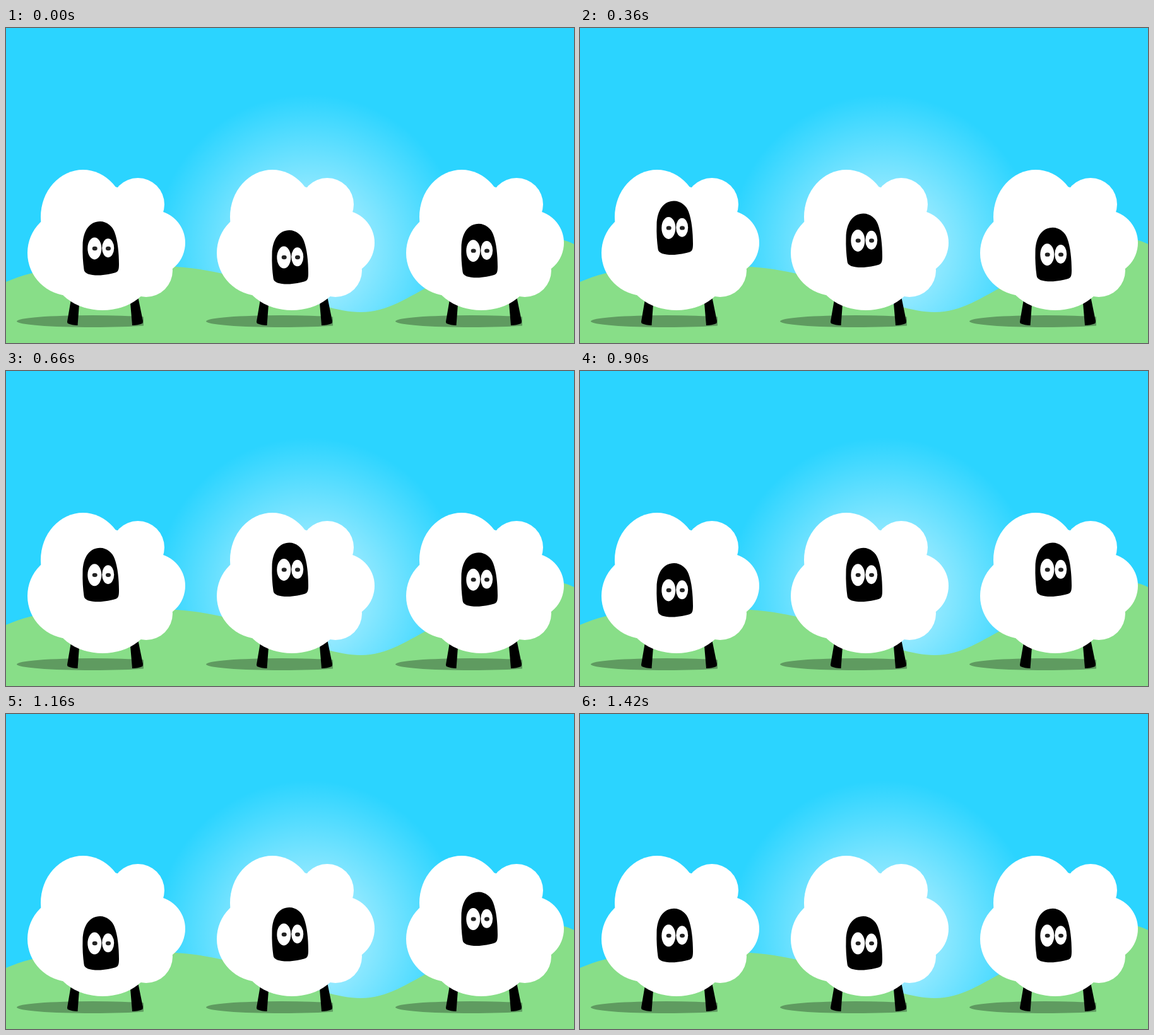
An HTML page with a canvas that plays this animation: 900x500 px, repeating every 1.44 s.

```html
<!DOCTYPE html>
<html lang="en">
<head>
<meta charset="utf-8">
<title>Three sheep</title>
<style>
  html, body { margin: 0; width: 100%; height: 100%; overflow: hidden; }
  canvas { display: block; width: 900px; height: 500px; }
</style>
</head>
<body>
<canvas id="stage" width="900" height="500"></canvas>
<script>
const ctx = document.getElementById('stage').getContext('2d');
const LOOP = 1440, STEP = 20, SPACING = 300;

const hills = new Path2D(`M0 403 C80 368 190 374 270 379 C400 388 490 451 562 451
  C605 451 635 428 680 405 C760 362 840 313 900 343 V500 H0 Z`);
const legs = new Path2D(`M104 425 L97 466 Q97 468 98 469 Q105 472 113.500 472 L117 425 Z
  M196 425 L200 472 Q209 472 216 469 Q217 468 217 465 L208 421 Z`);
const head = new Path2D(`M149 0 C133 0 122 14 121.500 38 C121 52 122 65 123.500 76
  C124 83 133 85.500 146 85.500 C156 85.500 168 83 174 81 C178 79.500 179 76 179 68
  C179 50 177 30 172 17 C169 8 160 0 149 0 Z`);

// Wool puffs: centre x, centre y, radius x, radius y
const wool = [
  [122, 300, 67, 75], [209, 280, 42, 42], [232, 341, 52, 52],
  [222, 385, 42, 42], [102, 357, 68, 68], [153, 385, 80, 63],
  [155, 335, 85, 85]
];

function fill(path, color) {
  ctx.fillStyle = color;
  ctx.fill(path);
}

function oval(x, y, rx, ry, color) {
  ctx.fillStyle = color;
  ctx.beginPath();
  ctx.ellipse(x, y, rx, ry, 0, 0, Math.PI * 2);
  ctx.fill();
}

function drawScene() {
  ctx.fillStyle = '#2bd4ff';
  ctx.fillRect(0, 0, 900, 500);
  const glow = ctx.createRadialGradient(480, 350, 0, 480, 350, 245);
  glow.addColorStop(0, 'rgba(255,255,255,0.75)');
  glow.addColorStop(1, 'rgba(255,255,255,0)');
  ctx.fillStyle = glow;
  ctx.fillRect(0, 0, 900, 500);
  fill(hills, '#88de88');
}

function drawShadow() {
  ctx.save();
  ctx.beginPath();
  ctx.rect(0, 450, 218, 30);
  ctx.clip();
  oval(137, 465.5, 120, 9.5, '#5f9b60');
  ctx.restore();
}

function drawHead(y) {
  ctx.save();
  ctx.translate(0, y);
  fill(head, '#000');
  oval(140.3, 43, 11, 17.5, '#fff');
  oval(161.7, 42.3, 9.5, 15, '#fff');
  oval(140.7, 43, 4, 3.2, '#222');
  oval(162, 43, 4, 3.2, '#222');
  ctx.restore();
}

function drawSheep(index, phase) {
  ctx.save();
  ctx.translate(index * SPACING, 0);
  drawShadow();
  fill(legs, '#000');
  wool.forEach(puff => oval(...puff, '#fff'));
  drawHead(296.6 + 24.5 * Math.cos(phase + (1 - index) * Math.PI / 3));
  ctx.restore();
}

function render(now) {
  const time = Math.floor((now % LOOP) / STEP) * STEP;
  const phase = (time + STEP) / LOOP * Math.PI * 2;
  drawScene();
  for (let i = 0; i < 3; i++) drawSheep(i, phase);
}

let start;
function tick(now) {
  start ??= now;
  render(now - start);
  requestAnimationFrame(tick);
}
render(0);
requestAnimationFrame(tick);
</script>
</body>
</html>
```
